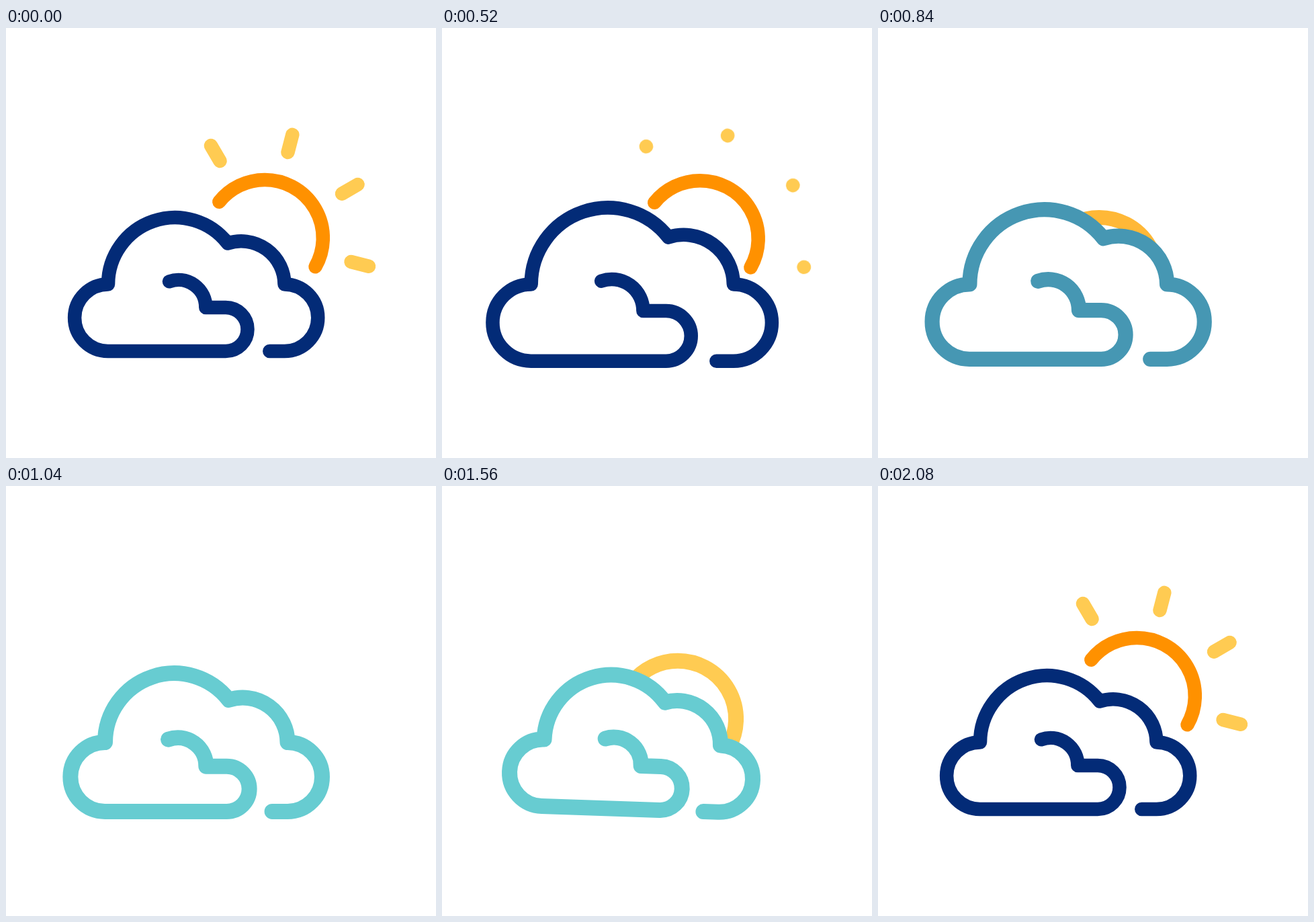
Recreate the animation shown at these times as an HTML page. Size 640 by 640 pixels, loop 2160 ms.

```html
<!DOCTYPE html>
<html lang="en">
<head>
<meta charset="utf-8">
<title>Partly cloudy</title>
<style>
  :root {
    --loop: 2160ms;
    --smooth: cubic-bezier(.333, 0, .667, 1);
    --navy: #032b77;
    --teal: #67ccd1;
    --orange: #ff9100;
    --yellow: #ffcb52;
  }
  html, body {
    margin: 0;
    width: 100%;
    height: 100%;
    overflow: hidden;
    background: #fff;
  }
  svg {
    display: block;
    fill: none;
    stroke-linecap: round;
    stroke-linejoin: round;
    animation: weight var(--loop) linear infinite;
  }
  .sun { animation: sink var(--loop) var(--smooth) infinite; }
  .disc { animation: disc-tint var(--loop) linear infinite; }
  .rays {
    stroke-dasharray: 1 2;
    animation: trim var(--loop) var(--smooth) infinite,
               ray-tint var(--loop) linear infinite;
  }
  .cloud {
    transform-origin: 283.2px 381.5px;
    animation: swell var(--loop) var(--smooth) infinite,
               rock var(--loop) var(--smooth) infinite,
               cloud-tint var(--loop) linear infinite;
  }
  .cloud path { vector-effect: non-scaling-stroke; }
  .body { fill: #fff; stroke: none; }

  @keyframes weight {
    0%, 31.48%, 96.3%, 100% { stroke-width: 20.5px; }
    42.59%, 86.11% { stroke-width: 23px; }
  }
  @keyframes cloud-tint {
    0%, 31.48%, 96.3%, 100% { stroke: var(--navy); }
    42.59%, 86.11% { stroke: var(--teal); }
  }
  @keyframes disc-tint {
    0%, 31.48%, 96.3%, 100% { stroke: var(--orange); }
    42.59%, 86.11% { stroke: var(--yellow); }
  }
  @keyframes ray-tint {
    0%, 31.48%, 96.3%, 100% { stroke: var(--yellow); }
    42.59%, 86.11% { stroke: var(--orange); }
  }
  /* grows, shrinks back, then rocks as the sun comes out */
  @keyframes swell {
    0% { scale: 1; animation-timing-function: cubic-bezier(.75, 0, .4, 1); }
    29.63%, 31.48% { scale: 1.154; }
    55.56%, 100% { scale: 1; }
  }
  @keyframes rock {
    0%, 53.7% { rotate: 0deg; }
    64.81% { rotate: -4.2deg; }
    76.16% { rotate: 4.2deg; }
    86.11%, 100% { rotate: 0deg; }
  }
  @keyframes sink {
    0%, 22.22% { translate: 0 0; }
    50.93%, 51.85% { translate: -90px 90px; }
    87.04%, 100% { translate: 0 0; }
  }
  /* rays retract outwards, then grow from the inside */
  @keyframes trim {
    0% {
      stroke-dashoffset: 0;
      opacity: 1;
      animation-timing-function: cubic-bezier(.85, 0, .6, 1);
    }
    25.9% { stroke-dashoffset: 1; opacity: 1; animation-timing-function: step-end; }
    25.91% { stroke-dashoffset: 1; opacity: 0; animation-timing-function: step-end; }
    72.7% { stroke-dashoffset: -1; opacity: 1; }
    77.78%, 100% { stroke-dashoffset: 0; opacity: 1; }
  }
</style>
</head>
<body>
<svg width="640" height="640" viewBox="0 0 640 640">
  <g class="sun">
    <g class="rays">
      <path pathLength="1" d="M305 175 L318.5 198"/>
      <path pathLength="1" d="M426.3 158.8 L419.5 185"/>
      <path pathLength="1" d="M523.5 233 L500 246.7"/>
      <path pathLength="1" d="M540 354.8 L513.5 348"/>
    </g>
    <path class="disc" d="M317.3 258.7 A86.5 86.5 0 0 1 385.2 226 A86.5 86.5 0 0 1 460.5 355.3"/>
  </g>
  <g class="cloud">
    <path class="body" d="M414.5 481 H151.7 A49.75 49.75 0 0 1 152 381.5
      A99.5 99.5 0 0 1 330 320.5 A64.5 64.5 0 0 1 414.5 381.5 A49.75 49.75 0 0 1 414.5 481 Z"/>
    <path d="M243 377.3 A40.7 40.7 0 0 1 297.3 416 H327 A32.5 32.5 0 0 1 327 481
      H151.7 A49.75 49.75 0 0 1 152 381.5 A99.5 99.5 0 0 1 330 320.5
      A64.5 64.5 0 0 1 414.5 381.5 A49.75 49.75 0 0 1 414.5 481 H392.3"/>
  </g>
</svg>
</body>
</html>
```
